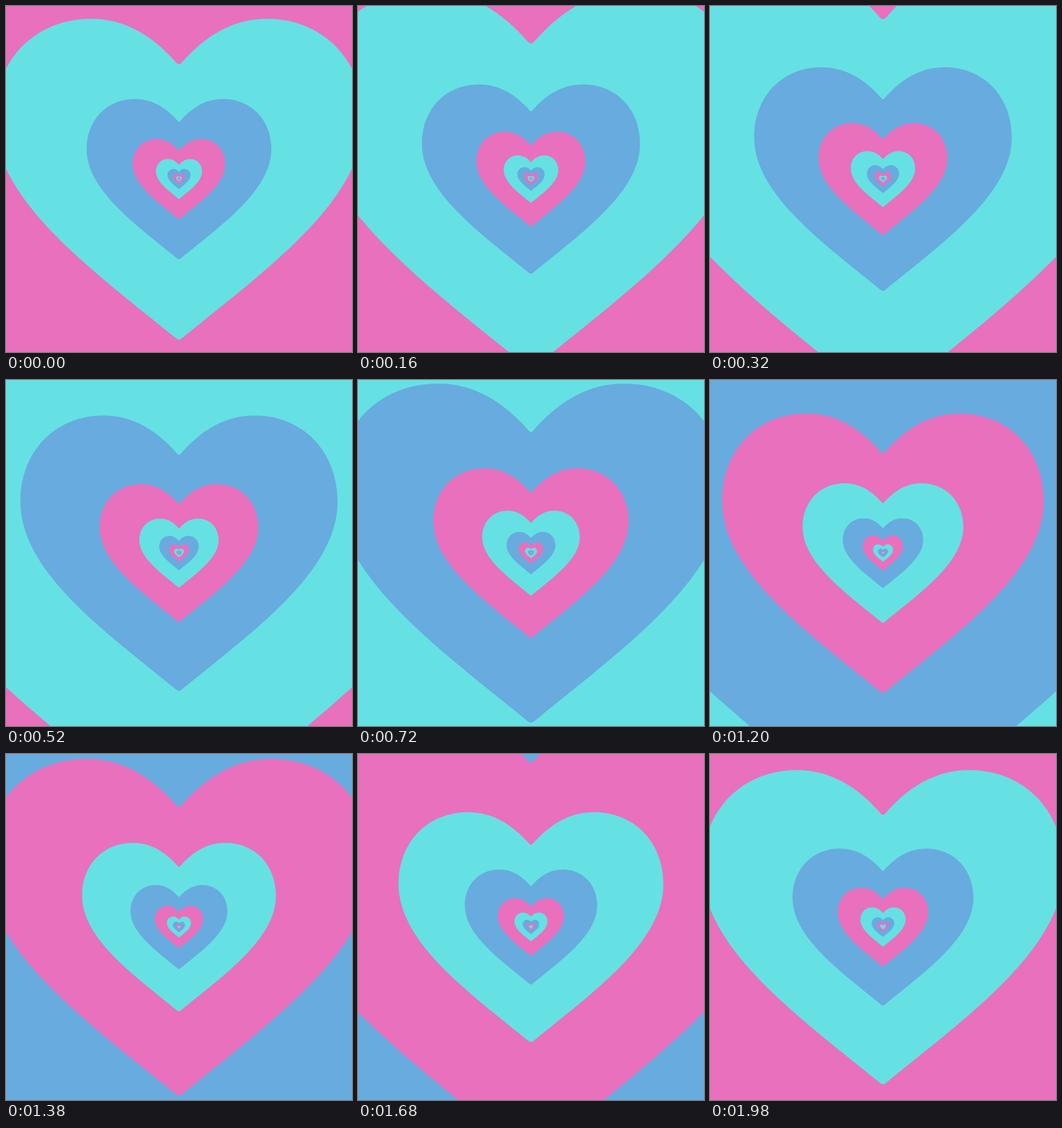
Write an HTML page that moves like this. It is 480 by 480 pixels and loops after 2 s.

```html
<!DOCTYPE html>
<html lang="en">
<head>
<meta charset="utf-8">
<title>Endless hearts</title>
<style>
  html, body { margin: 0; width: 100%; height: 100%; overflow: hidden; background: #68abdf; }
  svg { display: block; width: 100%; height: 100%; }
</style>
</head>
<body>
<svg viewBox="-240 -240 480 480">
  <defs>
    <path id="heart" d="M-3 -160.5 C-36 -198 -74 -222 -122 -222 C-200 -222 -256 -164 -256 -83
      C-256 30 -120 126 -4 220.8 Q0 224 4 220.8
      C120 126 256 30 256 -83 C256 -164 200 -222 122 -222 C74 -222 36 -198 3 -160.5 Q0 -157 -3 -160.5 Z"/>
  </defs>
  <g id="zoom"></g>
</svg>
<script>
  const LOOP = 2000;
  const COLORS = ['#68abdf', '#e970bc', '#65e1e3'];
  const RINGS = 12;
  const zoom = document.getElementById('zoom');

  // Each heart is half the size of the one around it.
  for (let i = 0; i < RINGS; i++) {
    const heart = document.createElementNS('http://www.w3.org/2000/svg', 'use');
    heart.setAttribute('href', '#heart');
    heart.setAttribute('fill', COLORS[i % COLORS.length]);
    heart.setAttribute('transform', `scale(${2 ** (2 - i)})`);
    zoom.append(heart);
  }

  // One loop doubles the size once per colour, so the ends meet.
  function draw(time) {
    const progress = (time % LOOP) / LOOP;
    zoom.setAttribute('transform', `scale(${2 ** (COLORS.length * progress)})`);
  }

  const start = performance.now();
  function tick() {
    draw(performance.now() - start);
    requestAnimationFrame(tick);
  }
  tick();
</script>
</body>
</html>
```
